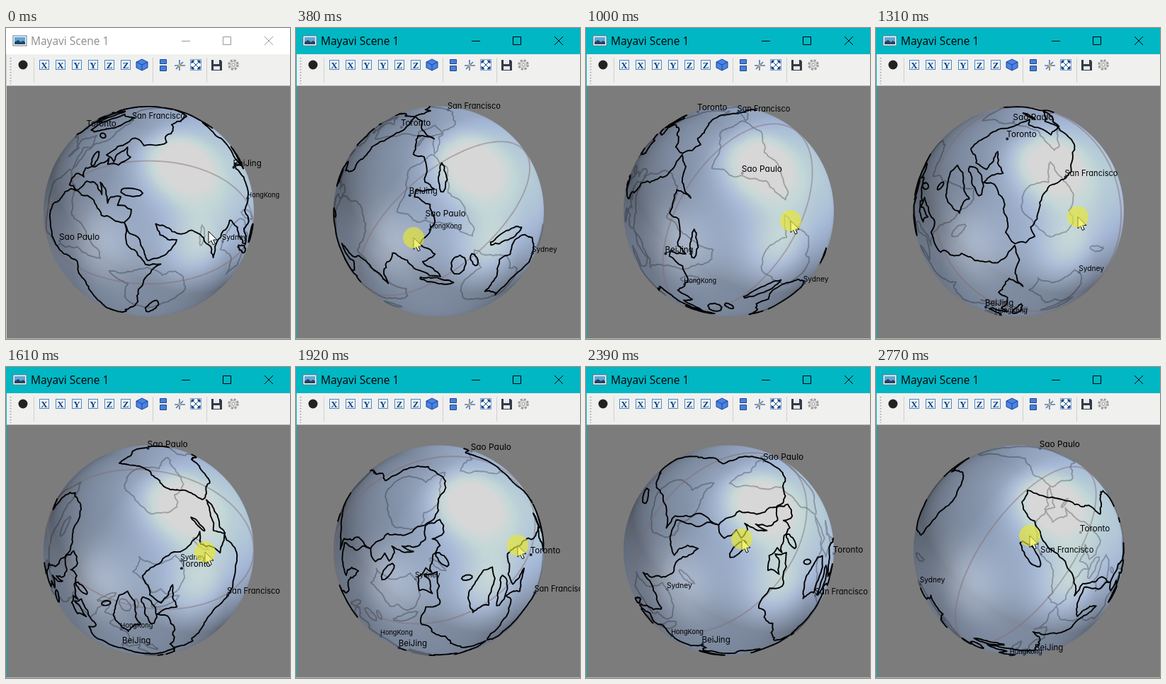
An HTML page with a canvas for the animation above (2850 ms loop, 401x439 px).

```html
<!DOCTYPE html>
<html lang="en">
<head>
<meta charset="utf-8">
<title>Mayavi Scene 1</title>
<style>
  html, body { margin: 0; width: 100%; height: 100%; overflow: hidden; background: #7c7c7c; }
  canvas, svg { position: absolute; left: 0; top: 0; width: 100vw; height: 100vh; }
  .title { font: 15.5px "Open Sans", sans-serif; }
  .axis { font: bold 13px "Liberation Serif", serif; text-anchor: middle; fill: #123f78; }
  .city { font-family: Inter, sans-serif; font-feature-settings: "cv11"; }
  .line { fill: none; stroke-width: 1.9; stroke-linejoin: round; stroke-linecap: round; }
</style>
</head>
<body>
<canvas id="globe" width="401" height="439"></canvas>
<svg viewBox="0 0 401 439">
  <path id="back" class="line" stroke="#000" stroke-opacity=".26"/>
  <path id="equator" class="line" stroke="#80696c" stroke-opacity=".45"/>
  <path id="front" class="line" stroke="#000"/>
  <g id="cities"></g>

  <rect id="bar" width="401" height="37"/>
  <rect x="10" y="11" width="19" height="14" fill="#f4f8fa" stroke="#667985"/>
  <path d="M12 13h15v10h-15z" fill="#5fa6dc"/>
  <path d="M12 23v-3l5-3 4 3 3-2 3 2v3z" fill="#25445a"/>
  <text id="title" class="title" x="35" y="24">Mayavi Scene 1</text>
  <path id="controls" d="M248 18.5h12M306.5 12.5h11v11h-11zM365 12l12 12M377 12l-12 12" fill="none"/>
  <rect y="37" width="401" height="44" fill="#f0f0ef"/>
  <path d="M0 81.5H401" stroke="#b4b4b4"/>
  <path d="M6.5 42v37" stroke="#a9a9a9" stroke-width="2" stroke-dasharray="1.5 2.5"/>
  <path d="M39.5 42v35M207.5 42v35M283.5 42v35" stroke="#cfcfcf"/>
  <circle cx="24" cy="52" r="6.5" fill="#222"/>
  <g id="axes"></g>
  <g stroke="#1846a0" stroke-linejoin="round">
    <path d="M184 48l8-4 8 4v8l-8 4-8-4z" fill="#4b83e2"/>
    <path d="M184 48l8 4 8-4M192 52v8" fill="none"/>
    <path d="M217.5 44.5h9v6h-9zM217.5 53.5h9v7h-9z" fill="#4a7fd0"/>
  </g>
  <path d="M245 45v15M238 53h15M240 58l10-10" stroke="#4c78bb" stroke-width="1.6"/>
  <circle cx="245" cy="53" r="2" fill="#d9b64c"/>
  <rect x="260.5" y="44.5" width="15" height="15" fill="#fff" stroke="#7d9cc4"/>
  <path d="M262 50v-4h4zM270 46h4v4zM262 54v4h4zM274 54v4h-4zM263 47l10 10M273 47l-10 10" fill="#174a88" stroke="#174a88"/>
  <path d="M290 45h13l2 2v13h-15z" fill="#333b46"/>
  <path d="M293 45h8v6h-8zM293 54h9v5h-9z" fill="#e8eaed"/>
  <circle cx="321" cy="52" r="6.5" fill="none" stroke="#999" stroke-width="2.5" stroke-dasharray="3 2.1"/>
  <circle cx="321" cy="52" r="5" fill="#ddd" stroke="#aaa"/>
  <circle cx="321" cy="52" r="2" fill="#fff" stroke="#999"/>
  <path id="border" d="M.5 37V439"/>
  <path d="M0 438.5H401" stroke="#b9b9b9"/>

  <g id="pointer">
    <path d="M0 0V16.5L3.8 13 6.5 19 9.3 17.7 6.600 12H12z" fill="#fff" stroke="#000"/>
    <circle id="press" r="15" fill="#e8e82e" fill-opacity=".65"/>
  </g>
</svg>
<script>
const $ = id => document.getElementById(id);
const RAD = Math.PI / 180;
const LOOP = 2850, CENTER = [201.5, 259], RADIUS = 148.5;
const DISTANCE = 4.6, FOCAL = 666, HORIZON = 1 / DISTANCE;

// step, latitude and longitude facing the viewer, roll, pointer x and y
const poses = [
  [0, 35.5, 45.5, 0, 286, 287],
  [5, 26.2, 123, 40.6, 166, 296],
  [13, 33.5, 163.4, 57.4, 289, 272],
  [21, 40.5, -57.1, 169.75, 281, 261],
  [27, 45.5, 26.5, -140.6, 329, 247],
  [31, 41.1, 39.3, -132, 220, 243],
  [36, -24.1, 48.9, -125.5, 217, 238]
].map(([step, lat, lon, roll, x, y]) => ({ step, x, y, turn: orientation(lat, lon, roll) }));

const cities = [
  ["BeiJing", 116.4, 39.9, 11.5], ["HongKong", 114.2, 22.3, 9.2],
  ["Sydney", 151.2, -33.9, 10.2], ["Toronto", -79.4, 43.7, 11.7],
  ["San Francisco", -122.4, 37.8, 11.1], ["Sao Paulo", -46.6, -23.5, 11.9]
];

// Quaternions
function multiply([a, b, c, d], [e, f, g, h]) {
  return [a*e - b*f - c*g - d*h, a*f + b*e + c*h - d*g, a*g - b*h + c*e + d*f, a*h + b*g - c*f + d*e];
}

function orientation(lat, lon, roll) {
  const half = angle => [Math.cos(angle * RAD / 2), Math.sin(angle * RAD / 2)];
  const [rc, rs] = half(roll), [xc, xs] = half(lat), [yc, ys] = half(-lon);
  return multiply(multiply([rc, 0, 0, rs], [xc, xs, 0, 0]), [yc, 0, ys, 0]);
}

const dot = (a, b) => a.reduce((sum, v, i) => sum + v * b[i], 0);

function slerp(a, b, k) {
  const cosine = dot(a, b), sign = cosine < 0 ? -1 : 1;
  const angle = Math.acos(Math.min(1, cosine * sign));
  if (angle < 1e-5) return a;
  const u = Math.sin((1 - k) * angle) / Math.sin(angle), v = sign * Math.sin(k * angle) / Math.sin(angle);
  return a.map((value, i) => value * u + b[i] * v);
}

function matrix([w, x, y, z]) {
  return [
    [1 - 2*(y*y + z*z), 2*(x*y - w*z), 2*(x*z + w*y)],
    [2*(x*y + w*z), 1 - 2*(x*x + z*z), 2*(y*z - w*x)],
    [2*(x*z - w*y), 2*(y*z + w*x), 1 - 2*(x*x + y*y)]
  ];
}

const onSphere = (lon, lat) => [
  Math.cos(lat * RAD) * Math.sin(lon * RAD), Math.sin(lat * RAD), Math.cos(lat * RAD) * Math.cos(lon * RAD)
];

function project(rows, p) {
  const [x, y, z] = rows.map(row => dot(row, p));
  const scale = FOCAL / (DISTANCE - z);
  return {
    at: `${(CENTER[0] + x * scale).toFixed(1)} ${(CENTER[1] - y * scale).toFixed(1)}`,
    front: z > HORIZON - .01
  };
}

// Three camera lights on a translucent, slightly glossy ball
const lights = [[45, 45, 1], [-60, -30, .6], [60, -30, .5]]
  .map(([azimuth, elevation, power]) => ({ towards: onSphere(azimuth, elevation), power }));

function shade(normal) {
  const view = [-normal[0], -normal[1], DISTANCE - normal[2]];
  const length = Math.hypot(...view);
  let diffuse = 0, gloss = 0;
  for (const { towards, power } of lights) {
    const facing = dot(normal, towards);
    if (facing <= 0) continue;
    const mirror = normal.map((n, i) => 2 * facing * n - towards[i]);
    diffuse += power * facing;
    gloss += .45 * power * Math.max(0, dot(mirror, view) / length) ** 5;
  }
  return [.67, .77, .93].map(c => 255 * (.7 * Math.min(1, c * diffuse + gloss) + .145));
}

function paintGlobe() {
  const { width, height } = $("globe"), context = $("globe").getContext("2d");
  const image = context.createImageData(width, height);
  for (let py = 0; py < height; py++) for (let px = 0; px < width; px++) {
    const dx = px + .5 - CENTER[0], dy = CENTER[1] - py - .5;
    const cover = Math.min(1, RADIUS + .5 - Math.hypot(dx, dy));
    if (cover <= 0) continue;
    const a = dx / FOCAL, b = dy / FOCAL, q = a * a + b * b;
    const depth = (DISTANCE - Math.sqrt(Math.max(0, 1 - (DISTANCE ** 2 - 1) * q))) / (1 + q);
    image.data.set([...shade([a * depth, b * depth, DISTANCE - depth]), 255 * cover], 4 * (py * width + px));
  }
  context.putImageData(image, 0, 0);
}

// Coasts: a few lon/lat key points, broken up by random midpoint displacement.
let seed = 11;
const random = () => (seed = seed * 16807 % 2147483647) / 2147483647;

function roughen(a, b) {
  const squeeze = Math.cos((a[1] + b[1]) / 2 * RAD);
  const dx = (b[0] - a[0]) * squeeze, dy = b[1] - a[1];
  if (Math.hypot(dx, dy) < 1.8) return [b];
  const bend = (random() - .5) * .3;
  const middle = [(a[0] + b[0]) / 2 - dy * bend / squeeze, (a[1] + b[1]) / 2 + dx * bend];
  return [...roughen(a, middle), ...roughen(middle, b)];
}

function coast(...numbers) {
  const keys = [];
  for (let i = 0; i < numbers.length; i += 2) keys.push(numbers.slice(i, i + 2));
  return keys.flatMap((key, i) => i ? roughen(keys[i - 1], key) : [key]).map(p => onSphere(...p));
}

function island(lon, lat, long, wide, tilt) {
  const c = Math.cos(tilt * RAD), s = Math.sin(tilt * RAD), outline = [];
  for (let angle = 0; angle <= 360; angle += 40) {
    const u = long * Math.cos(angle * RAD), v = wide * Math.sin(angle * RAD);
    outline.push(lon + (u * c - v * s) / Math.cos(lat * RAD), lat + u * s + v * c);
  }
  return coast(...outline);
}

const coasts = [
  // Eurasia, from Suez round by the Mediterranean, the Arctic and the Pacific
  coast(33,30, 36,36, 28,37, 29,41, 23,40, 22,37, 19,42, 13,45, 17,40, 9,44, 3,43, -2,37, -9,37, -9,43, -1,44,
    -4,48, 8,54, 10,57, 12,54, 21,55, 29,60, 22,65, 17,61, 16,56, 6,58, 11,64, 26,71, 40,67, 68,68, 73,72,
    104,77, 140,73, 190,66, 163,59, 157,51, 155,59, 137,54, 140,49, 128,40, 129,35, 122,40, 118,38, 122,31,
    114,22, 106,20, 109,12, 102,12, 104,1, 98,9, 96,16, 91,22, 80,15, 77.5,8, 73,20, 67,25, 57,26, 49,30,
    51,25, 59,22, 45,13, 33,30),
  // Africa
  coast(33,30, 20,31, 10,37, -6,36, -17,21, -8,4, 9,4, 14,-11, 18,-34, 26,-34, 35,-22, 40,-12, 51,11, 44,11, 33,30),
  // North America
  coast(-80,8, -84,15, -88,21, -95,18, -97,28, -84,30, -81,25, -76,36, -66,44, -56,52, -65,60, -78,62, -79,52,
    -94,60, -82,68, -115,68, -156,71, -168,66, -158,58, -150,60, -124,48, -123,38, -110,23, -105,20, -80,8),
  // South America
  coast(-78,9, -62,10, -50,0, -35,-6, -40,-21, -58,-37, -68,-54, -74,-50, -71,-20, -81,-5, -78,9),
  // Australia, Antarctica, Greenland
  coast(114,-24, 130,-12, 136,-15, 142,-11, 153,-27, 147,-38, 131,-32, 116,-35, 114,-24),
  coast(0,-70, 50,-67, 110,-66, 155,-69, 180,-78, 230,-75, 285,-72, 300,-63, 315,-77, 360,-70),
  coast(-45,60, -54,70, -68,77, -35,83, -20,72, -45,60),
  island(35, 43.5, 5, 1.8, 0),      // Black Sea
  island(47, -19, 7, 2.2, 72),      // Madagascar
  island(137, 36, 7, 1.5, 42),      // Japan
  island(114, 1, 5, 3.5, 45),       // Borneo
  island(101, 0, 8, 1.6, -45),      // Sumatra
  island(121, -2, 3.5, 1.5, 75),    // Sulawesi
  island(140, -5.5, 10, 2.2, -25),  // New Guinea
  island(172, -41, 7, 1.5, 55),     // New Zealand
  island(-2, 54, 4, 1.6, -70),      // Britain
  island(-19, 65, 2.5, 1.2, 0),     // Iceland
  island(-73, 68, 8, 2.5, -50),     // Baffin Island
  island(-79, 22, 4.5, .7, -20)     // Cuba
];
const equator = Array.from({ length: 121 }, (_, i) => onSphere(i * 3, 0));

$("axes").innerHTML = [..."XXYYZZ"].map((letter, i) => {
  const x = 54 + i * 23;
  return `<rect x="${x - 6.5}" y="45.5" width="13" height="13" fill="#eef5fc" stroke="#4a86bd"/>
    <text class="axis" x="${x}" y="56.5">${letter}</text>`;
}).join("");
$("cities").innerHTML = cities.map(([name, , , size]) =>
  `<g><circle r="2" fill="#10213f"/><text class="city" x="-1" y="-2" font-size="${size}">${name}</text></g>`).join("");

function drawCoasts(rows) {
  const paths = { front: "", back: "" };
  for (const line of coasts) {
    let last = project(rows, line[0]), side = "";
    for (const vertex of line.slice(1)) {
      const next = project(rows, vertex), now = next.front ? "front" : "back";
      if (now !== side) paths[now] += `M${last.at}`;
      paths[now] += `L${next.at}`;
      last = next;
      side = now;
    }
  }
  for (const side in paths) $(side).setAttribute("d", paths[side]);
}

function drawWindow(active) {
  $("bar").setAttribute("fill", active ? "#00b7c3" : "#fff");
  $("title").setAttribute("fill", active ? "#000" : "#8c8c8c");
  $("controls").setAttribute("stroke", active ? "#000" : "#999");
  $("border").setAttribute("stroke", active ? "#00b7c3" : "#d0d0d0");
  $("press").setAttribute("visibility", active ? "visible" : "hidden");
}

function render(time) {
  const step = time < 60 ? 0 : 1 + Math.floor((time - 50) / 77.5);
  const i = Math.max(1, poses.findIndex(pose => pose.step >= step));
  const from = poses[i - 1], to = poses[i];
  const k = (step - from.step) / (to.step - from.step);
  const rows = matrix(slerp(from.turn, to.turn, k));

  drawCoasts(rows);
  $("equator").setAttribute("d", "M" + equator.map(p => project(rows, p).at).join("L"));
  cities.forEach(([, lon, lat], n) => {
    const { at, front } = project(rows, onSphere(lon, lat)), group = $("cities").children[n];
    group.setAttribute("transform", `translate(${at})`);
    group.firstChild.setAttribute("opacity", front ? 1 : .35);
  });
  drawWindow(step > 0);
  $("pointer").setAttribute("transform",
    `translate(${from.x + (to.x - from.x) * k} ${from.y + (to.y - from.y) * k})`);
}

function tick() {
  render(performance.now() % LOOP);
  requestAnimationFrame(tick);
}
paintGlobe();
tick();
</script>
</body>
</html>
```
